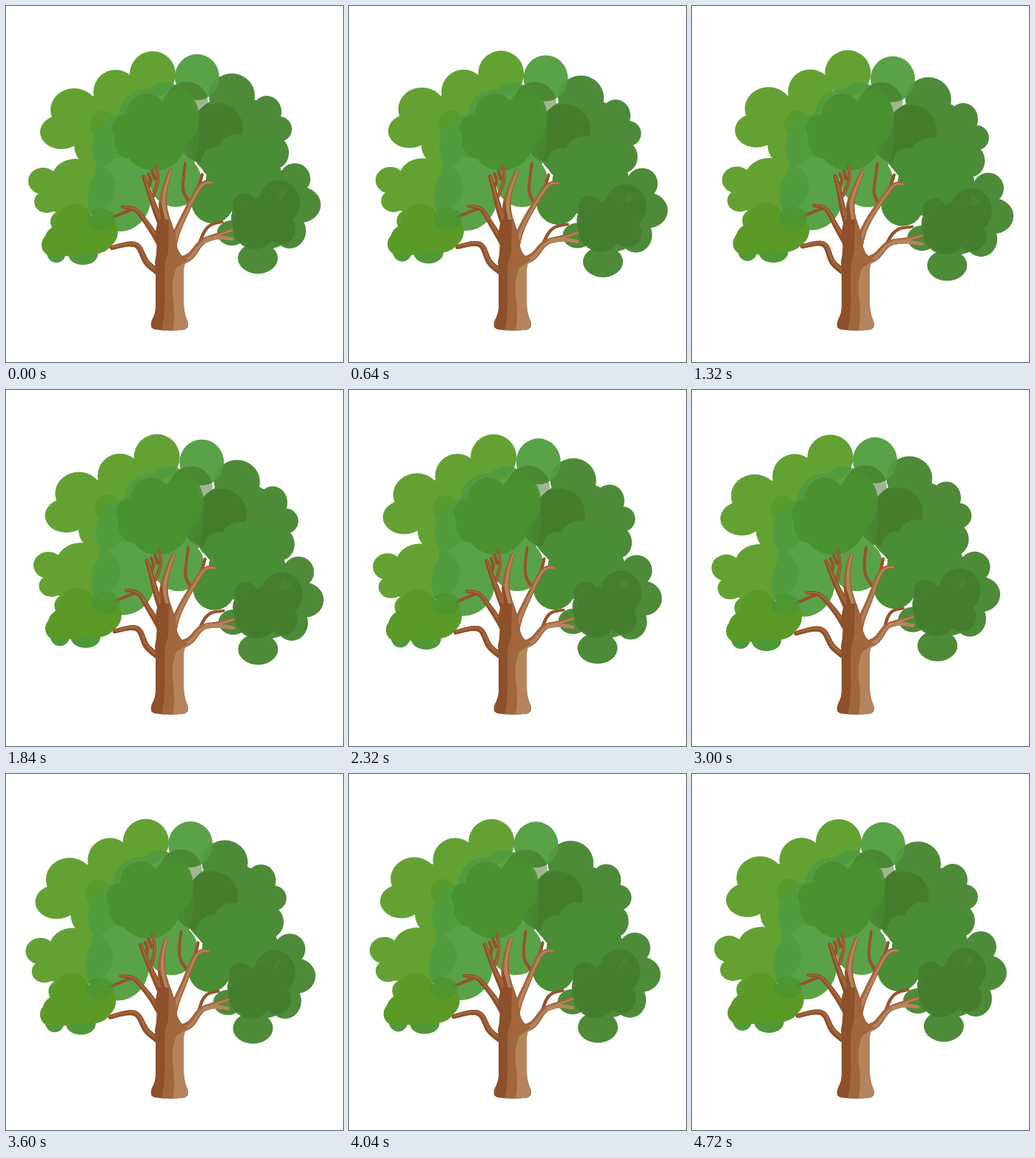
Animation of 455 by 480 pixels, one loop 4800 ms. Source, as an HTML page with a canvas:

```html
<!DOCTYPE html>
<html lang="en">
<head>
<meta charset="utf-8">
<title>Swaying tree</title>
<style>
  html, body { margin: 0; width: 100%; height: 100%; overflow: hidden; background: #fff; }
  canvas { display: block; }
</style>
</head>
<body>
<canvas id="stage" width="455" height="480"></canvas>
<script>
const ctx = document.getElementById('stage').getContext('2d');
const LOOP = 4800, STEP = 40, LAST = 4720;

// Two sway modes, keyed over the loop.
const TIMES = [0, 640, 1320, 2320, 3000, 4040, 4760];
const LEAN = [0, 0.7, 1.2, -0.2, -1, -0.5, 0];
const DIP = [0, 0.5, 1, 0.85, 0.5, 0.15, 0];

// Puppet pins: x, y, then lean and dip gains for dx and for dy.
const PINS = [
  [198, 61, 11.3, -1, 0, -2],
  [46, 170, 9, 1.5, -3, 1],
  [308, 91, 12, 0, 3, 1.5],
  [386, 166, 10, 3, 1.5, 10],
  [425, 268, 8.5, -1, 0, 16],
  [340, 361, 7, -4, 0, 10],
  [30, 236, 5.5, 4, -3, 2],
  [48, 322, 3.5, 3, -2.5, 1],
  [105, 349, 4, 1, -3, 0.5],
  [242, 211, 7, 0, 0, 0],
  [200, 150, 10.5, 0, 0, 0],
  [110, 250, 5.5, 3.5, -1.5, 1],
  [140, 286, 4, 3, -2, 0],
  [308, 300, 6, -1.5, 0, 7]
];
const FIXED = [[220, 300], [203, 358], [240, 342], [220, 420]];

let pins = [];

// Smooth curve through the keys, at rest at both ends of the loop.
function curve(values, t) {
  const end = TIMES.length - 1;
  let i = 0;
  while (i < end - 1 && t > TIMES[i + 1]) i++;
  const secant = k => (values[k + 1] - values[k]) / (TIMES[k + 1] - TIMES[k]);
  const slope = k => k === 0 || k === end ? 0 : (secant(k - 1) + secant(k)) / 2;
  const h = TIMES[i + 1] - TIMES[i], u = (t - TIMES[i]) / h, v = 1 - u;
  return values[i] * (1 + 2 * u) * v * v + values[i + 1] * u * u * (3 - 2 * u)
    + h * u * v * (slope(i) * v - slope(i + 1) * u);
}

function posePins(t) {
  const lean = curve(LEAN, t), dip = curve(DIP, t);
  pins = PINS.map(([x, y, xl, xd, yl, yd]) => [x, y, xl * lean + xd * dip, yl * lean + yd * dip])
    .concat(FIXED.map(([x, y]) => [x, y, 0, 0]));
}

function warp(x, y) {
  let sum = 0, dx = 0, dy = 0;
  for (const [px, py, ox, oy] of pins) {
    const w = ((x - px) ** 2 + (y - py) ** 2 + 60) ** -1.5;
    sum += w;
    dx += w * ox;
    dy += w * oy;
  }
  return [x + dx / sum, y + dy / sum];
}

// Union of ellipses [x, y, rx, ry].
function foliage(color, alpha, ...lobes) {
  const shape = new Path2D();
  for (const [x, y, rx, ry] of lobes) {
    const [cx, cy] = warp(x, y);
    shape.moveTo(cx + rx, cy);
    shape.ellipse(cx, cy, rx, ry, 0, 0, 2 * Math.PI);
  }
  ctx.globalAlpha = alpha;
  ctx.fillStyle = color;
  ctx.fill(shape);
  ctx.globalAlpha = 1;
}

function spline(points, s) {
  const n = points.length - 1;
  const i = Math.min(n - 1, Math.floor(s * n)), u = s * n - i;
  const at = k => points[Math.max(0, Math.min(n, k))];
  return [0, 1].map(c => {
    const [a, b, d, e] = [at(i - 1)[c], at(i)[c], at(i + 1)[c], at(i + 2)[c]];
    return b + u * ((d - a) + u * ((2 * a - 5 * b + 4 * d - e) + u * (3 * b - a - 3 * d + e))) / 2;
  });
}

function taper(points, w0, w1, color, ox = 0, oy = 0) {
  const steps = 26;
  ctx.strokeStyle = color;
  let last = null;
  for (let i = 0; i <= steps; i++) {
    const [x, y] = spline(points, i / steps);
    const w = w0 + (w1 - w0) * i / steps;
    const p = warp(x + ox * w, y + oy * w);
    if (last) {
      ctx.lineWidth = w;
      ctx.beginPath();
      ctx.moveTo(...last);
      ctx.lineTo(...p);
      ctx.stroke();
    }
    last = p;
  }
}

const DARK = '#8d502a', MID = '#a1663c', LIGHT = '#b5845d', RED = '#97542f';

function limb(points, w0, w1, base, edge, ox = 0.25, oy = 0) {
  taper(points, w0, w1, base);
  taper(points, w0 * 0.42, w1 * 0.42, edge, ox, oy);
}

const twig = (...points) => taper(points, 4.5, 3.5, RED);

function branches() {
  ctx.lineCap = 'round';
  twig([173, 273], [141, 286]);
  limb([[207, 319], [193, 297], [175, 275], [157, 271]], 9, 4, DARK, MID, 0.2, -0.2);
  limb([[207, 360], [190, 346], [179, 325], [166, 321], [143, 326]], 9, 6, DARK, MID, 0.15, -0.28);
  twig([193, 243], [195, 235], [192, 226]);
  limb([[211, 296], [200, 270], [186, 230]], 11, 5, DARK, MID);
  limb([[199, 256], [205, 235], [203, 215]], 5, 3.5, RED, MID);
  twig([201, 233], [197, 222]);
  limb([[218, 300], [212, 272], [214, 248], [222, 222]], 15, 5, MID, LIGHT);
  taper([[216, 310], [208, 265]], 9, 2, DARK);
  twig([247, 264], [239, 246], [242, 212]);
  twig([260, 246], [265, 227]);
  limb([[225, 323], [234, 297], [261, 245], [278, 238]], 11, 4, MID, LIGHT);
  twig([262, 318], [268, 304], [277, 295], [292, 291]);
  limb([[233, 345], [249, 337], [264, 319], [282, 310], [308, 301]], 12, 4, MID, LIGHT, 0.15, 0.22);
  taper([[270, 316], [286, 312], [305, 314]], 6, 4.5, LIGHT);
}

function trunk() {
  ctx.save();
  ctx.clip(new Path2D('M202 362V404Q202 415 197 423Q193 434 200 436Q221 439 242 436' +
    'Q248 433 245 425Q240 414 240 402V355Q240 346 247 343L238 337Q229 329 229 308' +
    'L222 288H205L201 309Q206 323 201 345Z'));
  const fill = (color, d) => { ctx.fillStyle = color; ctx.fill(new Path2D(d)); };
  fill(DARK, 'M180 270H260V445H180Z');
  fill(MID, 'M210 440Q215 415 214 385V358Q214 343 219 333L220 285H260V440Z');
  fill(LIGHT, 'M225 440Q229 415 225 388Q223 369 230 353L247 342H260V440Z');
  ctx.restore();
}

function backCrown() {
  foliage('#64a133', 1, [198, 92, 31, 31], [148, 116, 30, 30], [92, 140, 32, 29],
    [75, 170, 29, 23], [122, 188, 30, 30], [150, 160, 65, 45]);
  foliage('#64a133', 1, [50, 236, 20, 18], [94, 232, 32, 26], [55, 264, 17, 15],
    [103, 245, 45, 37], [75, 254, 28, 25]);
  foliage('#4f9828', 0.5, [131, 160, 17, 19]);
  foliage('#4d8b39', 1, [305, 121, 31, 30], [352, 143, 20, 22], [369, 166, 17, 17],
    [362, 198, 20, 22], [308, 178, 62, 58]);
}

function middleCrown() {
  foliage('#519e3e', 0.95, [258, 96, 30, 31], [190, 150, 38, 38], [160, 190, 44, 44],
    [153, 257, 43, 47], [140, 222, 20, 21], [229, 236, 35, 35], [215, 175, 46, 72]);
  foliage('#3f7122', 0.5, [244, 131, 29, 29], [285, 165, 35, 34], [262, 178, 28, 32]);
  foliage('#4a912f', 0.93, [160, 165, 17, 18], [190, 146, 27, 28], [233, 151, 28, 38],
    [168, 182, 22, 24], [200, 180, 43, 42]);
}

function rightCrown() {
  foliage('#498d34', 1, [283, 211, 20, 21], [312, 200, 27, 27], [345, 206, 25, 27],
    [322, 235, 52, 45], [279, 263, 29, 30]);
  foliage('#4d8b39', 1, [390, 233, 21, 21], [398, 268, 27, 24], [383, 303, 22, 24],
    [340, 340, 27, 21], [305, 306, 20, 17], [350, 292, 42, 36]);
}

function frontClumps() {
  foliage('#4f9939', 1, [68, 332, 13, 14], [104, 335, 20, 14]);
  foliage('#5f9e2c', 1, [73, 291, 13, 14]);
  foliage('#5c9a28', 1, [92, 292, 24, 25], [125, 305, 26, 24], [82, 315, 30, 22],
    [115, 320, 27, 15], [62, 322, 14, 15]);
  foliage('#4a942f', 0.75, [129, 288, 19, 15]);
  foliage('#447d2e', 0.96, [369, 265, 28, 30], [322, 268, 16, 15], [336, 296, 30, 32],
    [372, 301, 19, 20], [318, 286, 14, 18], [352, 284, 28, 28]);
}

function draw(t) {
  posePins(t);
  ctx.fillStyle = '#fff';
  ctx.fillRect(0, 0, 455, 480);
  backCrown();
  middleCrown();
  rightCrown();
  branches();
  trunk();
  frontClumps();
}

function frame(now) {
  draw(Math.min(LAST, Math.floor((now % LOOP) / STEP) * STEP));
  requestAnimationFrame(frame);
}
draw(0);
requestAnimationFrame(frame);
</script>
</body>
</html>
```
